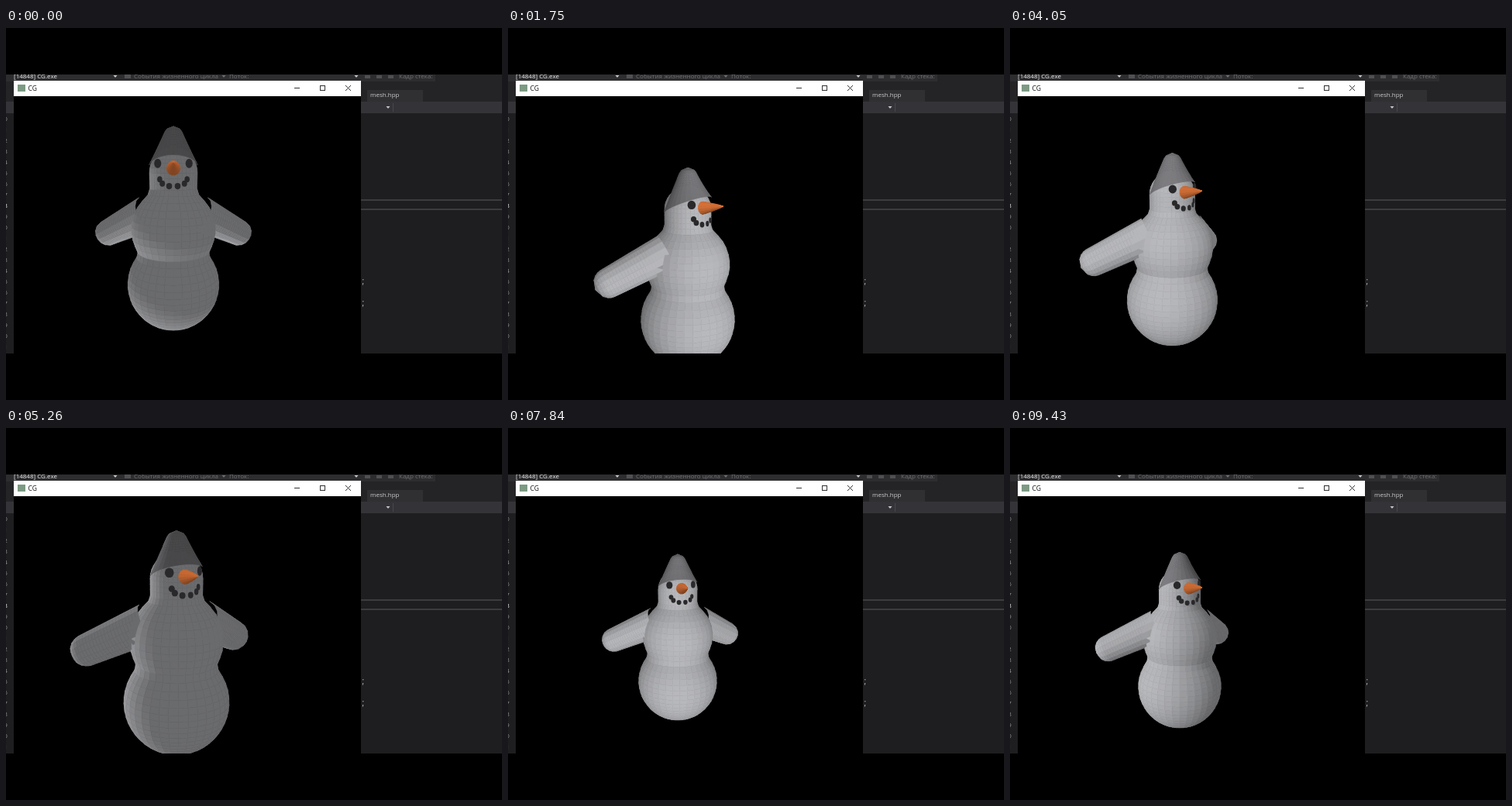
Animation of 640 by 480 pixels, one loop 9480 ms. Source, as an HTML page with a canvas:

```html
<!DOCTYPE html>
<html lang="en">
<head>
<meta charset="utf-8">
<title>CG</title>
<style>
  html, body { margin: 0; width: 100%; height: 100%; overflow: hidden; background: #000; }
  canvas { display: block; width: 640px; height: 480px; }
</style>
</head>
<body>
<canvas id="stage" width="640" height="480"></canvas>
<script>
const ctx = document.getElementById('stage').getContext('2d');
const LOOP = 9480, STEP = 40;
const SANS = '"Open Sans", "Noto Sans", sans-serif';
const PITCH = 17 * Math.PI / 180;

// ---- vectors ----
const lerp = (a, b, k) => a + (b - a) * k;
const add = (a, b, k = 1) => a.map((v, i) => v + b[i] * k);
const dot = (a, b) => a[0] * b[0] + a[1] * b[1] + a[2] * b[2];
const unit = a => a.map(v => v / (Math.hypot(...a) || 1));
const cross = (a, b) => [a[1] * b[2] - a[2] * b[1], a[2] * b[0] - a[0] * b[2], a[0] * b[1] - a[1] * b[0]];

// ---- model: x right, y up, z toward the face ----
function tube(from, to, radius, around, along, color, warp = p => p) {
  const axis = add(to, from, -1), dir = unit(axis);
  const ref = Math.abs(dir[2]) > .8 ? [1, 0, 0] : [0, 0, 1];
  const e2 = unit(add(ref, dir, -dot(dir, ref)));
  const e1 = cross(e2, dir);
  const rings = [];
  for (let j = 0; j <= along; j++) {
    const v = j / along, r = radius(v), ring = [];
    for (let i = 0; i <= around; i++) {
      const a = i / around * Math.PI * 2;
      ring.push(warp(add(add(add(from, axis, v), e1, r * Math.sin(a)), e2, r * Math.cos(a)), v));
    }
    rings.push(ring);
  }
  return { rings, color, bias: 0 };
}

const ball = (d, r) => Math.sqrt(Math.max(0, r * r - d * d));
const HEAD = 28.2;
function bodyRadius(y) {
  const head = y < 70 ? 0 : ball(Math.max(0, y - 98), HEAD);
  const parts = [head, ball(y - 30, 52), ball(y + 43, 60)];
  return Math.pow(parts.reduce((s, r) => s + r ** 10, 0), .1);
}

function arm(side) {
  const r = v => lerp(22, 17, v) * (v > .83 ? ball((v - .83) / .17, 1) : 1);
  return tube([32 * side, 50, -6], [106 * side, 10, -49], r, 16, 24, SNOW);
}

const SNOW = [1, 1.005, 1.025];
const TOP = 126, BOTTOM = -103;
const bodyAt = v => lerp(TOP, BOTTOM, (1 - Math.cos(v * Math.PI)) / 2);
const body = tube([0, 0, 0], [0, -1, 0], v => bodyRadius(bodyAt(v)), 36, 44, SNOW,
  (p, v) => [p[0], bodyAt(v), p[2]]);
const hat = tube([0, 148, 0], [0, 104, 0], v => v < .07 ? v / .07 * 8 : lerp(7, 28.5, v), 28, 15,
  [.68, .68, .7], (p, v) => [p[0], p[1] + .44 * p[2] * v, p[2]]);
hat.bias = 30;
const nose = tube([0, 103, 24], [0, 108, 56], v => 7.4 * (1 - v) ** .8, 14, 6, [1.22, .64, .31]);
nose.bias = 80;
nose.light = [0, .3, .95];
const parts = [body, arm(-1), arm(1), hat, nose];

const onHead = (x, y, r) => ({ p: [x, y, ball(x, HEAD)], r });
const coals = [onHead(-17, 108, 5), onHead(17, 108, 5)];
for (let i = 0; i < 6; i++) {
  const a = i * Math.PI / 5;
  coals.push(onHead(-15 * Math.cos(a), 91.5 - 7.5 * Math.sin(a), 3.4));
}

// ---- camera and light over time ----
const front = { yaw: 0, x: 216, y: 290, size: 1, dist: 330, light: [-.3, -.75, -.6] };
const side = { yaw: 46, x: 232, y: 335, size: 1.02, dist: 650, light: [.4, -.2, .85] };
const far = { yaw: 43, x: 207, y: 314, size: 1, dist: 650, light: [-.2, .2, .95] };
const near = { yaw: 22, x: 220, y: 307, size: 1.15, dist: 650, light: [-.75, 0, -.7] };
const low = { yaw: 13, x: 219, y: 292, size: .85, dist: 650, light: [0, -.95, .15] };
const bright = { ...low, light: [0, -.35, .95] };
const last = { yaw: 30, x: 219, y: 297, size: .9, dist: 650, light: [-.7, .1, .55] };
const small = { ...front, x: 227, y: 293, size: .87 };

const keys = [
  [0, front], [200, front], [1600, side], [1900, side], [2800, far], [3840, far], [4760, small],
  [5200, near], [5320, near], [5780, small], [6500, low], [6800, low], [7400, bright], [7840, bright],
  [8200, { ...bright, x: 261, size: 1.11 }], [8600, { ...near, light: far.light }],
  [9380, last], [LOOP, last]
];

function sceneAt(t) {
  const i = keys.findIndex(key => key[0] > t);
  const [t0, a] = keys[i - 1], [t1, b] = keys[i];
  const u = (t - t0) / (t1 - t0), k = u * u * (3 - 2 * u);
  const s = { light: unit(a.light.map((v, n) => lerp(v, b.light[n], k))) };
  for (const n of ['yaw', 'x', 'y', 'size', 'dist']) s[n] = lerp(a[n], b[n], k);
  return s;
}

function viewer(s) {
  const yaw = s.yaw * Math.PI / 180;
  const c = Math.cos(yaw), n = Math.sin(yaw), cp = Math.cos(PITCH), sp = Math.sin(PITCH);
  const turn = ([x, y, z]) => {
    const z1 = z * c - x * n;
    return [x * c + z * n, y * cp - z1 * sp, y * sp + z1 * cp];
  };
  const project = p => {
    const v = turn(p), k = s.size * s.dist / (s.dist - v[2]);
    return { v, k, x: s.x + v[0] * k, y: s.y - v[1] * k };
  };
  return { turn, project };
}

function shade(normal, light) {
  const lit = Math.max(0, (dot(normal, light) + .25) / 1.25);
  return 106 + 78 * lit;
}

function drawSnowman(s) {
  const { turn, project } = viewer(s);
  const faces = [];
  for (const part of parts) {
    const rings = part.rings.map(ring => ring.map(project));
    for (let j = 1; j < rings.length; j++) {
      for (let i = 1; i < rings[j].length; i++) {
        const a = rings[j - 1][i - 1], b = rings[j - 1][i], c = rings[j][i], d = rings[j][i - 1];
        if ((c.x - a.x) * (d.y - b.y) - (c.y - a.y) * (d.x - b.x) <= 0) continue;
        const normal = unit(cross(add(d.v, b.v, -1), add(c.v, a.v, -1)));
        const level = shade(normal, part.light || s.light);
        faces.push({
          points: [a, b, c, d],
          depth: (a.v[2] + b.v[2] + c.v[2] + d.v[2]) / 4 + part.bias,
          color: `rgb(${part.color.map(v => Math.round(Math.min(255, v * level)))})`
        });
      }
    }
  }
  // Coals lie above the head and below the nose.
  for (const { p, r } of coals) {
    const facing = unit(turn([p[0], 0, p[2]]))[2];
    if (facing > .2) faces.push({ coal: project(p), r, facing, depth: 105 });
  }
  faces.sort((a, b) => a.depth - b.depth);
  for (const f of faces) f.coal ? drawCoal(f) : drawFace(f);
}

function drawFace({ points, color }) {
  ctx.beginPath();
  for (const p of points) ctx.lineTo(p.x, p.y);
  ctx.closePath();
  ctx.fillStyle = ctx.strokeStyle = color;
  ctx.lineWidth = .7;
  ctx.fill();
  ctx.stroke();
}

function drawCoal({ coal, r, facing }) {
  ctx.fillStyle = '#29292b';
  ctx.beginPath();
  ctx.ellipse(coal.x, coal.y, r * coal.k * Math.max(.4, facing), r * coal.k, 0, 0, Math.PI * 2);
  ctx.fill();
}

// ---- desktop ----
function rect(x, y, w, h, color) {
  ctx.fillStyle = color;
  ctx.fillRect(x, y, w, h);
}

function label(text, x, y, color, size = 8) {
  ctx.font = `${size}px ${SANS}`;
  ctx.fillStyle = color;
  ctx.fillText(text, x, y);
}

function line(color, x0, y0, x1, y1, width = 1) {
  ctx.strokeStyle = color;
  ctx.lineWidth = width;
  ctx.beginPath();
  ctx.moveTo(x0, y0);
  ctx.lineTo(x1, y1);
  ctx.stroke();
}

function arrow(x, y, color) {
  ctx.fillStyle = color;
  ctx.beginPath();
  ctx.moveTo(x - 2.5, y - 1);
  ctx.lineTo(x + 2.5, y - 1);
  ctx.lineTo(x, y + 2);
  ctx.fill();
}

function drawEditor() {
  const faint = '#707074', pale = '#c8c8ca';
  rect(0, 0, 640, 480, '#000');
  ctx.save();
  ctx.beginPath();
  ctx.rect(0, 60, 640, 360);
  ctx.clip();
  rect(0, 60, 640, 360, '#1e1e20');
  rect(0, 60, 640, 35, '#242427');
  rect(0, 60, 554, 9, '#2d2d30');
  rect(466, 80, 72, 15, '#303033');
  rect(0, 95, 640, 15, '#343438');
  rect(499, 97, 1, 11, '#48484c');
  for (const y of [222, 234]) line('#464648', 458, y, 640, y, 1.5);

  label('[14848] CG.exe', 10, 65, '#eee');
  arrow(141, 62, pale);
  rect(153, 60, 8, 5, '#505054');
  label('События жизненного цикла', 165, 65, faint);
  arrow(281, 62, faint);
  label('Поток:', 288, 65, faint);
  arrow(452, 62, pale);
  for (let x = 463; x < 500; x += 15) rect(x, 61, 7, 4, '#505054');
  label('Кадр стека:', 507, 65, faint);
  label('mesh.hpp', 470, 89, pale);
  arrow(493, 102, pale);
  for (let i = 0; i < 22; i++) label(i % 10, -2.7, 120 + i * 14, i === 8 ? '#fff' : '#98989a');
  for (const y of [330, 358]) label(';', 459.5, y, pale, 10);
  ctx.restore();
}

function drawWindow() {
  rect(10, 68, 448, 352, '#000');
  rect(10, 68, 448, 20, '#fff');
  rect(15, 73, 10, 9, '#7d9a84');
  label('CG', 28.5, 81, '#111', 8.5);
  line('#333', 372, 77.5, 379, 77.5);
  line('#333', 438, 74, 445, 81);
  line('#333', 445, 74, 438, 81);
  ctx.strokeRect(405.5, 74.5, 6, 6);
}

function draw(t) {
  drawEditor();
  drawWindow();
  ctx.save();
  ctx.beginPath();
  ctx.rect(10, 88, 448, 332);
  ctx.clip();
  drawSnowman(sceneAt(t));
  ctx.restore();
}

const start = performance.now();
let shown = -1;
function tick() {
  const t = Math.floor((performance.now() - start) % LOOP / STEP) * STEP;
  if (t !== shown) draw(shown = t);
  requestAnimationFrame(tick);
}
tick();
</script>
</body>
</html>
```
